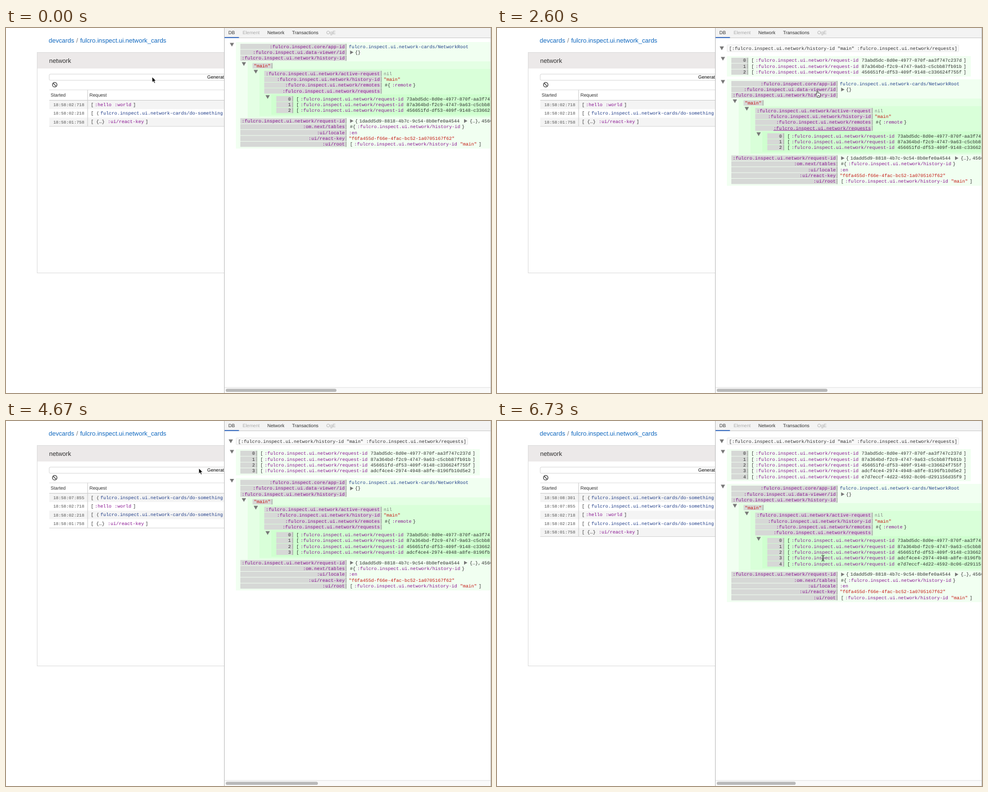
Recreate the animation shown at these times as an HTML page. Size 863 by 649 pixels, loop 8.8 s.

```html
<!DOCTYPE html>
<html lang="en">
<head>
<meta charset="utf-8">
<title>Network inspector</title>
<style>
html, body { margin: 0; width: 100%; height: 100%; overflow: hidden; background: #fff; }
svg { display: block; position: absolute; left: 0; top: 0; }
text { font: 8.25px "Liberation Mono", monospace; fill: #303030; white-space: pre; text-rendering: geometricPrecision; }
.sans { font-family: "Liberation Sans", Arial, sans-serif; }
.big { font-size: 11.17px; }
.time { font-size: 7.64px; fill: #555; }
.btn { fill: #000; }
.link { fill: #1068bf; }
.off { fill: #aaa; }
.dim { fill: #777; }
.kw { fill: #881391; }
.sym { fill: #1f3c88; }
.str { fill: #c41a16; }
.nil { fill: #808080; }
.end { text-anchor: end; }
.hover { text-decoration: underline; }
.box { fill: rgb(100, 255, 100); fill-opacity: .09; }
.cell { fill: #d6d8d6; }
.edge { fill: #aab2aa; }
.tri { fill: #777; }
</style>
</head>
<body>
<svg width="863" height="649" viewBox="0 0 863 649">
  <defs>
    <linearGradient id="blue" x2="0" y2="1">
      <stop offset="0" stop-color="#3f8ff2"/><stop offset="1" stop-color="#0f5fe0"/>
    </linearGradient>
  </defs>
  <g id="scene"></g>
  <g id="arrow" stroke="#fff" stroke-width=".8">
    <path d="M0 0V9.6L2.2 7.6L3.8 11.2L5.5 10.4L4 7H7Z" fill="#000"/>
  </g>
  <g id="beam" fill="none" stroke="#222" stroke-width="1">
    <path d="M-2.6 -5Q0 -5 0 -3.6Q0 -5 2.6 -5M0 -3.6V3.6M-2.6 5Q0 5 0 3.6Q0 5 2.6 5M-1.3 1.6H1.3"/>
  </g>
  <g id="hand" fill="#fff" stroke="#222" stroke-width=".8" stroke-linejoin="round">
    <path d="M-1 .4Q0 -.8 1 .4V3.8Q1.9 3 2.7 4Q3.6 3.4 4.3 4.5Q5.4 4.2 5.6 5.4V7.4L4.6 9.3V11H-.4V9.5L-3.4 5.9Q-3 4.6 -1.9 5.3L-1 6.2Z"/>
    <path d="M1.2 7V9.2M2.8 7V9.2"/>
  </g>
</svg>
<script>
const LOOP = 8800, ROW = 10.36, NS = ":fulcro.inspect.ui.network/";
const IDS = [
  "73abd5dc-8d0e-4977-870f-aa3f747c237d", "87a364bd-f2c9-4747-9a63-c5cbb87fb91b",
  "456651fd-df53-409f-9148-c336624f755f", "adcf4ce4-2974-4948-a8fe-8196fb10d5e2",
  "e7d7eccf-4d22-4592-8c06-d291156d35f9"];
const SOMETHING = [["", 151, "["], ["", 161, "("], ["sym", 168, "fulcro.inspect.ui.network-cards/do-something"]];
// newest first
const REQUESTS = [
  ["18:58:08:301", SOMETHING],
  ["18:58:07:855", SOMETHING],
  ["18:58:02:718", [["", 151, "["], ["kw", 158, ":hello"], ["kw", 193.3, ":world"], ["", 226, "]"]]],
  ["18:58:02:218", SOMETHING],
  ["18:58:01:758", [["", 151, "["], ["", 160.5, "{…}"], ["kw", 181, ":ui/react-key"], ["", 248, "]"]]]];
// pointer path: time, x, y
const PATH = [
  [0, 260, 87], [800, 578, 115.5], [1000, 578, 115.5], [1400, 587, 142], [1730, 589, 159],
  [1800, 589, 159], [2130, 570, 112], [2600, 570, 112], [3330, 519.5, 176], [3470, 518, 176],
  [3870, 345, 81.7], [4000, 345, 81.7], [4070, 345.5, 83], [4460, 345.5, 83], [4930, 339.6, 85.5],
  [5200, 339.6, 85.5], [6070, 584, 244.5], [6266, 584, 244.5], [6333, 583, 244.5],
  [6600, 583, 244.5], [6730, 580, 244]];

const $ = id => document.getElementById(id);
const rect = (x, y, w, h, attr) => `<rect x="${x}" y="${y}" width="${w}" height="${h}" ${attr}/>`;
const fill = (x, y, w, h, color) => rect(x, y, w, h, `fill="${color}"`);
const text = (cls, x, y, s) => `<text class="${cls}" x="${x}" y="${y}">${s}</text>`;
const line = (y, parts) => parts.map(([cls, x, s]) => text(cls, x, y + 2.5, s)).join("");
const box = (x, y, h, right = 862) => rect(x, y, right - x, h, 'class="box"');
const down = (x, y) => `<path class="tri" d="M${x - 3.8} ${y - 3.2}h7.6l-3.8 6.6z"/>`;
const right = (x, y) => `<path class="tri" d="M${x - 3} ${y - 3.4}v6.8l6 -3.4z"/>`;
const cell = (x, y, w) => rect(x, y - 4.9, w, 9.5, 'class="cell"') + rect(x + w - 1.5, y - 4.9, 1.5, 9.5, 'class="edge"');

// Positions of everything in the panel for n requests
function layout(n, watched) {
  const top = watched ? 91.1 + (n - 3) * ROW : 25;
  const inner = [top + 34.3, top + 47.9, top + 93];
  const list = 5.2 + n * ROW, tail = top + 140.3 + (n - 3) * ROW;
  const keys = [];
  const add = (names, x, w, y) => names.forEach((name, i) => keys.push({ name, x, w, y: y + i * ROW }));
  add([":fulcro.inspect.core/app-id", ":fulcro.inspect.ui.data-viewer/id", NS + "history-id"], 417, 189, top + 8);
  add(["active-request", "history-id", "remotes", "requests"].map(s => NS + s), 459.5, 209, top + 56);
  add([NS + "request-id", ":om.next/tables", ":ui/locale", ":ui/react-key", ":ui/root"], 417, 189, tail);
  return { top, inner, list, tail, keys };
}

function idRows(n, y, x) {
  return IDS.slice(0, n).map((id, i) => {
    const cy = y + 8 + i * ROW;
    return cell(x, cy, 30) + line(cy, [["end", x + 26, i], ["", x + 35.5, "["],
      ["kw", x + 43, NS + "request-id"], ["", x + 231.8, id], ["", x + 413, "]"]]);
  }).join("");
}

function leftPage(n, pressed) {
  let s = text("sans big link", 76, 25.5, "devcards") + text("sans big dim", 124.9, 25.5, "/") +
    text("sans big link", 132, 25.5, "fulcro.inspect.ui.network_cards");
  s += rect(55.5, 43.5, 400, 392, 'fill="#fff" stroke="#ddd"') + fill(56, 44, 400, 28, "#ece9e9");
  s += text("sans big", 76.7, 62, "network");
  s += rect(77, 82, 620, 11, `rx="2" stroke="${pressed ? "#2a6fd8" : "#c8c8c8"}" stroke-width=".7" fill="${pressed ? "url(#blue)" : "#fff"}"`);
  s += text("sans btn", 358, 90.4, "Generate request");
  s += '<g fill="none" stroke="#444" stroke-width="1.3"><circle cx="86.7" cy="100.9" r="4"/><path d="M83.9 98.1l5.6 5.6"/></g>';
  const rows = REQUESTS.slice(5 - n), h = 15.2;
  rows.forEach(([time, parts], i) => {
    const y = 129 + i * h;
    if (i % 2 == 0) s += fill(77, y, 320, h, "#f4f4f4");
    s += text("time", 84.3, y + 10.1, time) + line(y + 7.4, parts);
  });
  s += fill(77, 109.5, 320, 1, "#ddd") + fill(77, 128, 320, 1, "#ccc") + fill(77, 129 + n * h, 320, .8, "#ccc") +
    fill(144.7, 110, 1, 19 + n * h, "#ccc");
  return s + text("sans", 79.5, 122, "Started") + text("sans", 148.5, 122, "Request");
}

function watchPanel(n) {
  return down(400, 36) + rect(409.5, 30, 412, 12, 'rx="1" fill="#f8f8f8" stroke="#e2e2e2" stroke-width=".8"') +
    line(36.2, [["", 413, `[${NS}history-id "main" ${NS}requests]`]]) +
    down(402, 54.6) + box(409, 50, 5.2 + n * ROW, 843) + idRows(n, 49.8, 417);
}

function dbTree(n, lay, hover) {
  const { top, inner: [a, b, c], list, tail, keys } = lay;
  let s = box(409, top, tail - top + 4 * ROW + 7.7) + box(430, a, c - a + list + 5) +
    box(451, b, c - b + list + 2.5) + box(472, c, list);
  s += down(402, top + 4.7) + down(423.3, a + 4.7) + down(444.5, b + 4.7) + down(465.6, c + 4.7);
  keys.forEach((k, i) => {
    s += cell(k.x, k.y, k.w) + line(k.y, [["kw end" + (i == hover ? " hover" : ""), k.x + k.w - 3.3, k.name]]);
  });
  s += cell(438.7, a + 8, 35.5) + line(a + 8, [["str", 441, '"main"']]);
  const val = (i, ...parts) => { s += line(keys[i].y, parts); };
  val(0, ["sym", 610, "fulcro.inspect.ui.network-cards/NetworkRoot"]);
  val(1, ["", 621, "{}"]);
  val(3, ["nil", 672, "nil"]);
  val(4, ["str", 672, '"main"']);
  val(5, ["", 674, "#{"], ["kw", 687, ":remote"], ["", 724, "}"]);
  val(7, ["", 621, "{"], ["", 628.7, "1dadd5d9-8818-4b7c-9c54-8b8efe0a4544"], ["", 825, "{…},"], ["", 846, "456651fd"]);
  val(8, ["", 612, "#{"], ["kw", 625, NS + "history-id"], ["", 811, "}"]);
  val(9, ["kw", 610, ":en"]);
  val(10, ["str", 610, '"f6fa455d-f66e-4fac-bc52-1a0705167f62"']);
  val(11, ["", 612, "["], ["kw", 619.6, NS + "history-id"], ["str", 808, '"main"'], ["", 841, "]"]);
  return s + right(615.3, keys[1].y) + right(615.3, tail) + right(818, tail) + idRows(n, c, 481);
}

function chrome(n) {
  let s = fill(389, 0, 474, 17, "#f3f3f3") + fill(389, 17, 474, 1, "#ccc") + fill(389, 16, 25.5, 2, "#4a78c4");
  [["", 395.7, "DB"], ["off", 421, "Element"], ["", 465, "Network"], ["", 509, "Transactions"], ["off", 570, "OgE"]]
    .forEach(([cls, x, label]) => { s += text("sans " + cls, x, 11.2, label); });
  s += fill(389, 639, 474, 10, "#fafafa") + fill(389, 638.7, 474, 1, "#e0e0e0");
  s += rect(391, 641.5, [197, 164, 140.5][n - 3], 5.6, 'rx="2.8" fill="#b9b9b9"');
  return s + fill(388, 0, 1, 649, "#bdbdbd") + fill(862, 0, 1, 649, "#c4c4c4");
}

function pointer(t) {
  const i = PATH.findIndex(p => p[0] > t);
  if (i < 0) return PATH[PATH.length - 1].slice(1);
  const [t0, x0, y0] = PATH[i - 1], [t1, x1, y1] = PATH[i];
  const u = (t - t0) / (t1 - t0), e = u * u * (3 - 2 * u);
  return [x0 + (x1 - x0) * e, y0 + (y1 - y0) * e];
}

let shown = "";
function draw(now) {
  const t = Math.floor((now % LOOP + 4) * .015) / .015;
  const watched = t > 2590;
  const n = t > 4920 ? 5 : t > 4460 ? 4 : 3;
  const pressed = t > 4260 && t < 4460 || t > 4710 && t < 4920;
  const lay = layout(n, watched);
  const [x, y] = pointer(t);

  let hover = lay.keys.findIndex(k => x > k.x && x < k.x + k.w && Math.abs(y - k.y) < ROW / 2);
  const overText = x > 517 && y > lay.inner[2] + 3 && y < lay.inner[2] + lay.list - 2;
  const kind = hover >= 0 ? "hand" : overText ? "beam" : "arrow";
  if (watched && t < 2640) hover = 6; // hover lags behind the layout shift

  const state = [watched, n, pressed, hover].join();
  if (state != shown) {
    shown = state;
    $("scene").innerHTML = leftPage(n, pressed) + fill(388, 0, 475, 649, "#fff") +
      (watched ? watchPanel(n) : "") + dbTree(n, lay, hover) + chrome(n);
  }
  for (const id of ["arrow", "beam", "hand"]) {
    $(id).setAttribute("display", id == kind ? "inline" : "none");
    $(id).setAttribute("transform", `translate(${x} ${y})`);
  }
}

const start = performance.now();
function tick() {
  draw(performance.now() - start);
  requestAnimationFrame(tick);
}
tick();
</script>
</body>
</html>
```
